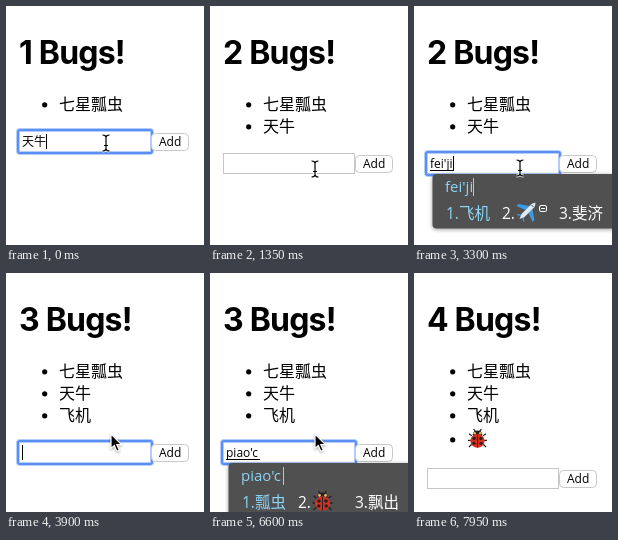
Write an HTML page that moves like this. It is 198 by 239 pixels and loops after 8.85 s.

```html
<!DOCTYPE html>
<html lang="zh-CN">
<meta charset="utf-8">
<title>Bugs</title>
<style>
html, body { margin: 0; width: 100%; height: 100%; overflow: hidden; background: #fff }
svg { display: block; width: 198px; height: 239px }
text { font: 12px "Open Sans", "Noto Sans CJK SC", sans-serif; white-space: pre }
.title { font: 700 32px Inter, sans-serif; letter-spacing: -.8px }
.item { font: 300 16px "Noto Sans CJK SC", sans-serif }
.pinyin { font-size: 15px; fill: #8ed4f6 }
.choice { font-size: 15.5px; fill: #fff }
.choice.first { fill: #8ed4f6 }
.popup { filter: drop-shadow(0 1px 2px #0006) }
</style>
<svg id="stage" viewBox="0 0 198 239"></svg>
<script>
const LOOP = 8850;
const BUGS = ['七星瓢虫', '天牛', '飞机', 'ladybug'];
const ROW = [0, 135.5, 157.5, 179.5, 205.5];   // form centre by list length

// Icons are drawn in a 20 x 20 box
const ICONS = {
  ladybug: `<path d="M4 7L1 5M16 7l3-2M3 12H0M17 12h3M4 16l-3 3M16 16l3 3M8 3L6 0M12 3l2-3" stroke="#222" stroke-width="1.3"/>
    <ellipse cx="10" cy="5.5" rx="5" ry="4" fill="#222"/>
    <circle cx="7" cy="4.5" r="1.4" fill="#e9b95c"/><circle cx="13" cy="4.5" r="1.4" fill="#e9b95c"/>
    <ellipse cx="10" cy="12.5" rx="7.5" ry="7.2" fill="#d8301f"/>
    <path d="M10 6v13.5" stroke="#222"/>
    <g fill="#222"><circle cx="6.5" cy="10" r="1.8"/><circle cx="13.5" cy="10" r="1.8"/>
    <circle cx="6.3" cy="15" r="1.7"/><circle cx="13.7" cy="15" r="1.7"/></g>`,
  plane: `<path d="M9 8L0 4l2-2 11 2zM12 11l4 9 2-2-2-11z" fill="#3c9be0"/>
    <path d="M4 14l-4-1 1-1 5 1zM6 16l1 4 1-1-1-5z" fill="#3c9be0"/>
    <path d="M3 17L5 12 15 2q4-2 4-1t-1 4L8 15z" fill="#dcebf6"/>
    <path d="M15 3l2 2" stroke="#357"/>`,
  runner: `<g transform="translate(19) scale(-1 1)">
    <g fill="none" stroke-linecap="round" stroke-linejoin="round">
    <path d="M10 6L5 7 3 10M11 7l3 4 4-1" stroke="#f6c445" stroke-width="1.6"/>
    <path d="M8 13l-3 3-4 1M9 13l4 2-1 4" stroke="#f6c445" stroke-width="2"/>
    <path d="M10.5 7L8 12" stroke="#ee5a3a" stroke-width="4"/>
    <path d="M8 13l-2 2M9 13l3 1.5" stroke="#b04a9a" stroke-width="2.6"/></g>
    <circle cx="13" cy="3" r="2.6" fill="#f6c445"/><path d="M10 3q1-4 5-2l-3 1z" fill="#5a3a20"/></g>`
};

const four = chars => [33, 72, 113, 161].map((x, i) => [x, `${i + 1}.${chars[i]}`]);
const arrow = (x, y) => ['arrow', x, y];
const beam = (x, y) => ['beam', x, y];
const typing = (text, caret, choices) => ({ text, caret, choices });
const commit = (text, caret) => ({ text, caret, choices: null });
const added = count => ({ count, focus: false, pressed: false, text: '', caret: 0 });

// Each step changes part of the previous state; caret 0 is hidden
const STEPS = [
  [0, { count: 1, focus: true, text: '天牛', caret: 40, choices: null, pressed: false, cursor: beam(100, 137) }],
  [150, { cursor: beam(124, 138) }],
  [300, { cursor: arrow(158, 138) }],
  [450, { cursor: arrow(174, 136) }],
  [600, { pressed: true, cursor: arrow(175, 135) }],
  [750, { ...added(2), cursor: arrow(174, 135) }],
  [900, { cursor: arrow(170, 136) }],
  [1200, { cursor: beam(125, 156) }],
  [1350, { cursor: beam(105, 163) }],
  [1500, { focus: true, caret: 16 }],
  [1650, { cursor: beam(106, 162) }],
  [1950, { caret: 0 }],
  [2250, commit('d', 23)],
  [2700, commit('', 16)],
  [3000, typing('f', 20, four('分发非飞'))],
  [3150, typing('fei', 30, four('飞非费肥'))],
  [3300, typing("fei'ji", 39, [[32, '1.飞机'], [88, '2.', 'plane'], [145, '3.斐济']])],
  [3600, commit('飞机', 40)],
  [3900, { count: 3, ...commit('', 16), cursor: arrow(105, 161) }],
  [4350, { caret: 0 }],
  [4950, { caret: 16 }],
  [5400, { caret: 0 }],
  [5700, typing('p', 23, [[33, '1.怕'], [72, '2.跑'], [113, '3.', 'runner'], [161, '4.拍']])],
  [5850, typing('pi', 26, four('皮批屁匹'))],
  [6000, typing('piao', 41, four('票飘漂瓢'))],
  [6150, typing("piao'c", 50, [[32, '1.瓢虫'], [88, '2.', 'ladybug'], [145, '3.飘出']])],
  [6600, { caret: 0 }],
  [7200, { ...commit('ladybug', 32), cursor: arrow(148, 167) }],
  [7350, { cursor: arrow(162, 177) }],
  [7500, { pressed: true, cursor: arrow(164, 179) }],
  [7650, added(4)],
  [7800, { cursor: arrow(184, 206) }],
  [7950, { cursor: null }]
];

const label = (x, y, str, cls = '') => `<text x="${x}" y="${y}" class="${cls}">${str}</text>`;
const box = (x, y, w, h, attrs = '') => `<rect x="${x}" y="${y}" width="${w}" height="${h}" ${attrs}/>`;
const icon = (name, x, y, size) =>
  `<g transform="translate(${x} ${y}) scale(${size / 20})">${ICONS[name]}</g>`;

function drawItem(name, i) {
  const y = [98, 120, 142, 166][i];
  return `<circle cx="38.7" cy="${y + .8}" r="2.6"/>` +
    (ICONS[name] ? icon(name, 54, y - 10, 19) : label(53, y + 6, name, 'item'));
}

function drawForm({ count, focus, text, caret, choices, pressed }) {
  const c = ROW[count];
  const ring = attrs => box(12, c - 11.5, 134, 23, `rx="2" fill="#fff" stroke="#5a90f4" ${attrs}`);
  let out = focus
    ? ring('stroke-width="4" stroke-opacity=".45"') + ring('stroke-width="2" fill-opacity="0"')
    : box(13.5, c - 10, 131, 20, 'fill="#fff" stroke="#c6c6c6"');
  out += box(145.5, c - 8, 37, 17, `rx="4" fill="${pressed ? '#e4e4e4' : '#fff'}" stroke="#c8c8c8"`);
  out += label(153, c + 4.5, 'Add');
  out += ICONS[text] ? icon(text, 17, c - 6.5, 13) : label(16, c + 4.5, text);
  if (choices) out += box(16, c + 6.5, (caret || 50) - 16, 1);
  if (caret) out += box(caret, c - 7.5, 1, 15);
  return out;
}

function drawPopup({ count, text, choices }) {
  if (!choices) return '';
  const top = ROW[count] + 10.5;
  const end = 31 + { f: 5, fei: 17, "fei'ji": 28, p: 9, pi: 13, piao: 31, "piao'c": 42 }[text];
  return box(18.5, top, 200, 54.5, 'rx="4" fill="#505050" class="popup"') +
    label(31, top + 18, text, 'pinyin') + box(end, top + 4, 1, 18, 'fill="#8ed4f6"') +
    choices.map(([x, str, name], i) =>
      label(x, top + 45, str, i ? 'choice' : 'choice first') +
      (name ? icon(name, x + 14.5, top + 28, 20) : '') +
      (name === 'plane' ? box(x + 37.5, top + 31.5, 7, 6, 'rx="1.5" fill="none" stroke="#fff"') +
        box(x + 39, top + 34, 4, 1, 'fill="#fff"') : '')
    ).join('');
}

function drawCursor(cursor) {
  if (!cursor) return '';
  const [kind, x, y] = cursor;
  if (kind === 'arrow') {
    return `<path transform="translate(${x} ${y})" d="M0 0V14.5l3.3-3 2.5 5.8 2.5-1-2.5-5.7h4.7z"
      stroke="#fff" stroke-width="1.2" style="filter:drop-shadow(0 1px 1px #0005)"/>`;
  }
  const d = 'M-3.5-8q3 0 3.5 2 .5-2 3.5-2M0-6V6M-3.5 8q3 0 3.5-2 .5 2 3.5 2M-2 2.5h4';
  return `<g transform="translate(${x} ${y})" fill="none">
    <path d="${d}" stroke="#fff" stroke-width="3"/><path d="${d}" stroke="#000" stroke-width="1.2"/></g>`;
}

let shown = -1;
function frame() {
  const t = performance.now() % LOOP;
  const past = STEPS.filter(([start]) => start <= t);
  if (past.length !== shown) {
    shown = past.length;
    const state = Object.assign({}, ...past.map(step => step[1]));
    stage.innerHTML = label(13, 58, `${state.count} Bugs!`, 'title') +
      BUGS.slice(0, state.count).map(drawItem).join('') +
      drawForm(state) + drawPopup(state) + drawCursor(state.cursor);
  }
  requestAnimationFrame(frame);
}
frame();
</script>
</html>
```
